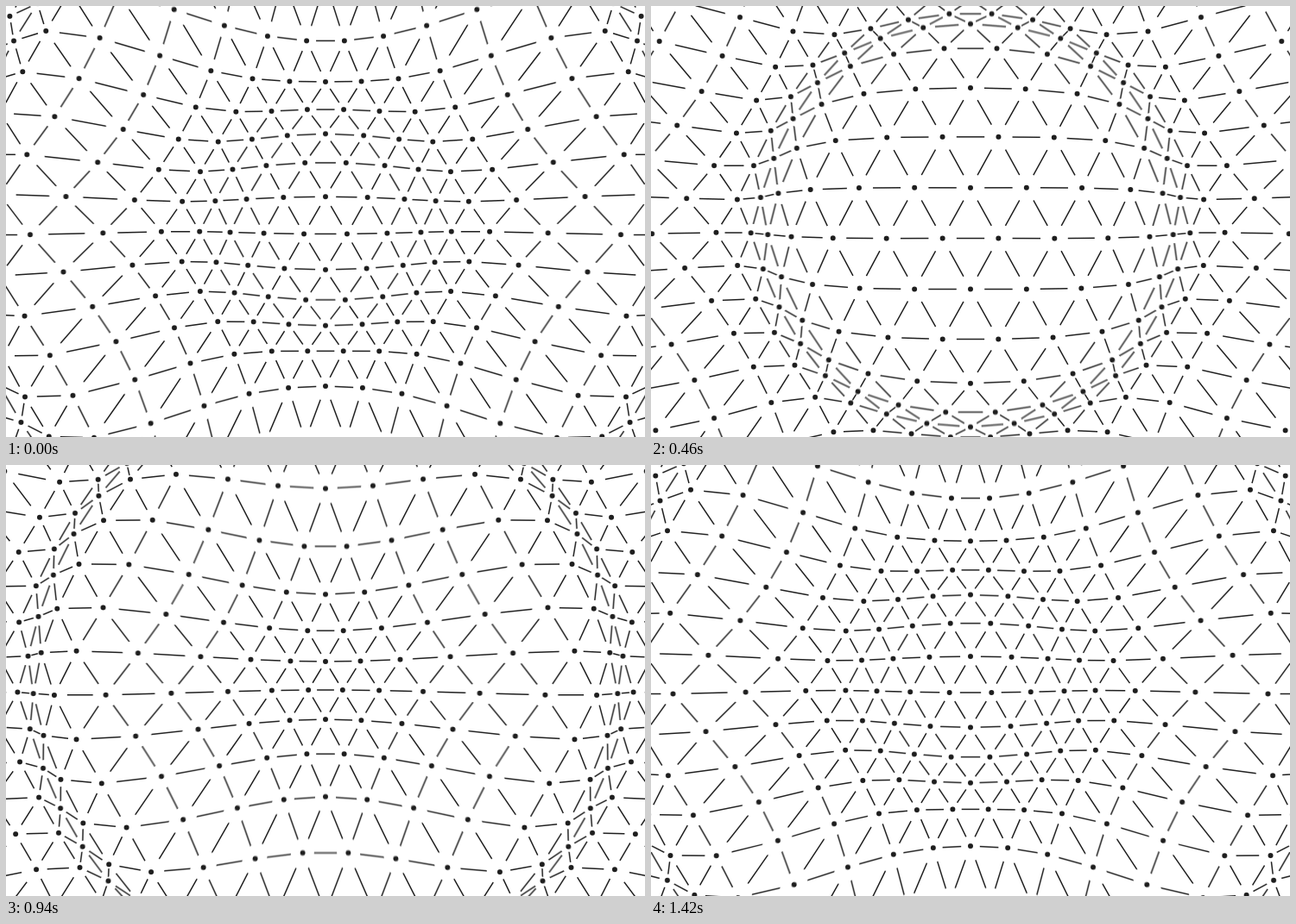
Recreate the animation shown at these times as an HTML page with a canvas. Size 740x500 px, loop 1.44 s.

```html
<!DOCTYPE html>
<html lang="en">
<head>
<meta charset="utf-8">
<title>Rippling lattice</title>
<style>
  html, body { margin: 0; width: 100%; height: 100%; overflow: hidden; background: #fff; }
  canvas { display: block; }
</style>
</head>
<body>
<canvas id="stage" width="740" height="500"></canvas>
<script>
const ctx = document.getElementById('stage').getContext('2d');
const W = 740, H = 500;
const FRAMES = 72, FRAME_MS = 20;
const SAMPLES = 5, SHUTTER = 0.6;
const PITCH = 50, ROW = PITCH * Math.sqrt(3) / 2;
const INK = '#202020';

// Scales a lattice point by a ripple whose phase lags with squared distance.
function warp(x, y, t) {
  const d = x * x + y * y;
  const wave = Math.exp(-1e-5 * d) * Math.sin(2 * Math.PI * t - 3.5e-5 * d);
  return [x * 1.33 ** wave, y * 1.4 ** wave];
}

// Adds the middle half of the segment between two points.
function link([ax, ay], [bx, by]) {
  const dx = (bx - ax) / 4, dy = (by - ay) / 4;
  ctx.moveTo(ax + dx, ay + dy);
  ctx.lineTo(bx - dx, by - dy);
}

function drawLattice(t) {
  const nodes = [];
  ctx.beginPath();
  for (let row = -11; row <= 11; row++) {
    const shift = row % 2 ? 0 : PITCH / 2;
    const y = (row + 1 / 3) * ROW;
    for (let col = -13; col <= 13; col++) {
      const x = col * PITCH + shift;
      const node = warp(x, y, t);
      link(node, warp(x + PITCH, y, t));
      link(node, warp(x - PITCH / 2, y + ROW, t));
      link(node, warp(x + PITCH / 2, y + ROW, t));
      nodes.push(node);
    }
  }
  ctx.stroke();

  ctx.beginPath();
  for (const [x, y] of nodes) {
    ctx.moveTo(x + 3, y);
    ctx.arc(x, y, 3, 0, 2 * Math.PI);
  }
  ctx.fill();
}

// Averages several moments within the shutter time for motion blur.
function render(frame) {
  ctx.setTransform(1, 0, 0, 1, 0, 0);
  ctx.clearRect(0, 0, W, H);
  ctx.translate(W / 2, H / 2);
  ctx.globalCompositeOperation = 'lighter';
  ctx.globalAlpha = 1 / SAMPLES;
  ctx.strokeStyle = ctx.fillStyle = INK;
  ctx.lineWidth = 1.5;
  for (let i = 0; i < SAMPLES; i++) {
    drawLattice((frame + SHUTTER * i / SAMPLES) / FRAMES);
  }
}

let shown = -1;
function tick(now) {
  const frame = Math.floor(now / FRAME_MS) % FRAMES;
  if (frame !== shown) render(shown = frame);
  requestAnimationFrame(tick);
}
tick(0);
</script>
</body>
</html>
```
